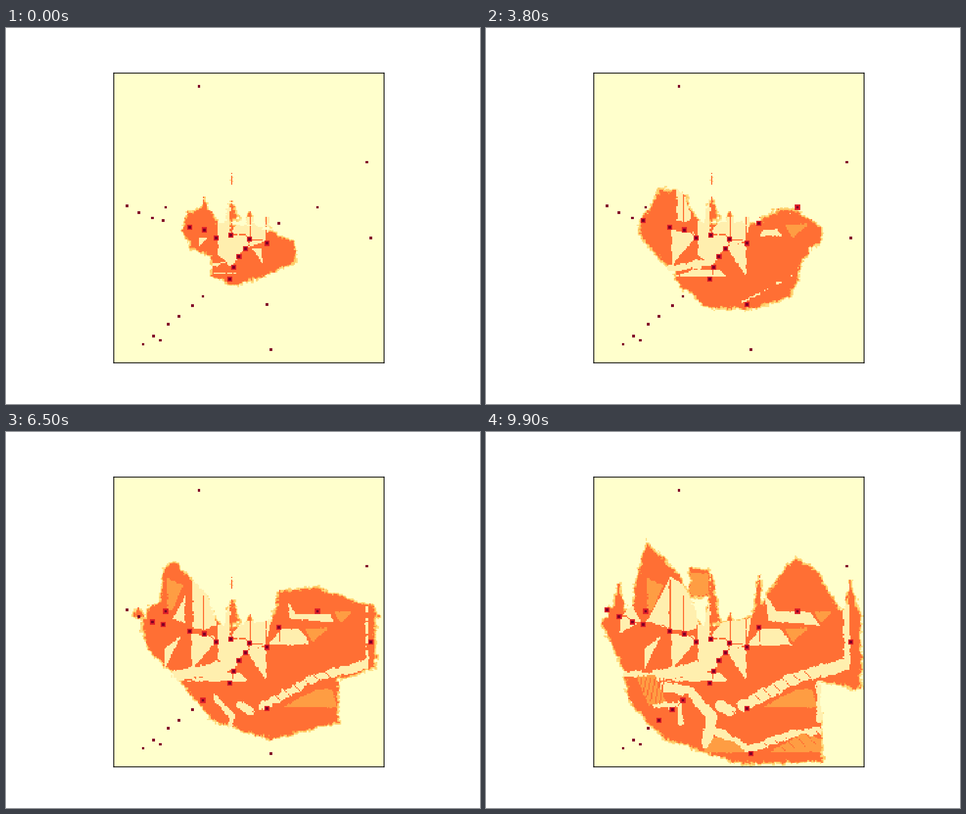
A matplotlib script for the animation above (10 s loop, 840x667 px).

```python
import numpy as np
import matplotlib.pyplot as plt
from matplotlib.animation import FuncAnimation
from matplotlib.colors import ListedColormap
from matplotlib.path import Path

ROWS, COLS = 218, 203
CELL, LEFT, TOP = 2.356, 191.4, 80.0
STEPS, STEP = 100, 0.1
COLOURS = ["#ffffcc", "#ffefae", "#fede84", "#feca66",
           "#fe9d43", "#ff6f34", "#dd2029", "#800026"]
PALE, RIM, EDGE, SOFT, FULL, HALO, FOOD = range(1, 8)

rng = np.random.default_rng(4)
X, Y = np.meshgrid(LEFT + (np.arange(COLS) + 0.5) * CELL,
                   TOP + (np.arange(ROWS) + 0.5) * CELL)
grain = rng.random(X.shape)


def smooth(a, n):
    """Box blur with unit spread."""
    for axis in (0, 1):
        a = sum(np.roll(a, i, axis) for i in range(n))
    return a / a.std()


rough = 0.5 * smooth(rng.normal(size=X.shape), 2) + 0.7 * smooth(rng.normal(size=X.shape), 5)


def distance(pts, closed=True):
    """Distance in cells to a line, or signed distance to a polygon."""
    p = np.reshape(pts, (-1, 2)).astype(float)
    ends = np.roll(p, -1, 0) if closed else p[1:]
    best = np.full(X.shape, np.inf)
    for (ax, ay), (bx, by) in zip(p, ends):
        dx, dy = bx - ax, by - ay
        u = np.clip(((X - ax) * dx + (Y - ay) * dy) / (dx * dx + dy * dy), 0, 1)
        best = np.minimum(best, np.hypot(X - ax - u * dx, Y - ay - u * dy))
    if closed:
        inside = Path(p).contains_points(np.c_[X.ravel(), Y.ravel()])
        best[inside.reshape(X.shape)] *= -1
    return best / CELL


def progress(t, t0, t1):
    return np.clip((t - t0) / (t1 - t0), 0, 1)


lobes, regions, veins = [], [], []


def spike(x, base, left, right, y0, y1, t0=0.0):
    """A finger whose tip climbs from y0 to y1 along a vein."""
    ends = [distance([x - left, base, x - 3, y, x + 3, y, x + right, base])
            for y in (y0, y1)]
    lobes.append((t0, 9.9, *ends))
    vein(t0, x, y1, x, base + 25)


def patch(level, t0, t1, *pts):
    d = distance(pts) + 0.3 * rough
    regions.append((level, t0, t1, d, -d.min()))


def trail(t0, t1, width, *pts):
    d = distance(pts, closed=False) + 0.6 * rough - width
    regions.append((PALE, t0, t1, d, width))


def vein(t0, x0, y0, x1, y1):
    n = int(max(abs(x1 - x0), abs(y1 - y0)) / CELL) + 1
    c = ((np.linspace(x0, x1, n) - LEFT) / CELL).astype(int)
    r = ((np.linspace(y0, y1, n) - TOP) / CELL).astype(int)
    veins.append((t0, r, c))


# Outline at the beginning, later and at the end
early, late, last = map(distance, (
    [310, 360, 321, 325, 345, 320, 352, 300, 370, 330, 378, 350, 390, 345, 470, 357,
     514, 380, 515, 415, 440, 450, 396, 458, 362, 440, 362, 406, 328, 392],
    [238, 350, 250, 310, 272, 300, 278, 240, 300, 228, 350, 280, 383, 345, 470, 335,
     480, 282, 550, 272, 625, 300, 655, 305, 657, 420, 590, 440, 592, 516, 470, 548,
     368, 515, 297, 432, 250, 385],
    [203, 345, 215, 308, 258, 312, 265, 260, 284, 190, 350, 260, 383, 345, 470, 325,
     510, 265, 548, 218, 590, 250, 628, 312, 665, 315, 667, 460, 592, 445, 600, 588,
     440, 589, 315, 545, 252, 480, 240, 415]))

spike(399, 345, 10, 18, 308, 248)
spike(432, 350, 6, 10, 325, 318)
spike(462, 355, 5, 8, 336, 334)
spike(484, 346, 16, 10, 345, 252, 2)
spike(646, 330, 14, 18, 310, 262, 6)
spike(236, 330, 18, 14, 318, 268, 5)
vein(0, 374, 343, 374, 404)
vein(0, 351, 290, 351, 358)
vein(6, 326, 262, 326, 353)

# Pale ground left behind
patch(PALE, -2, -1, 376, 343, 386, 343, 397, 300, 397, 362, 418, 338, 470, 330,
      461, 380, 425, 388, 400, 424, 376, 403)
patch(PALE, -1, 1.5, 426, 386, 461, 380, 461, 440)
patch(PALE, -1, 4, 328, 357, 368, 362, 372, 373, 330, 420)
patch(PALE, -0.5, 8, 328, 350, 326, 255, 350, 270, 372, 315, 378, 345, 352, 356)
patch(PALE, -1, 5, 368, 427, 412, 427, 430, 442, 320, 442)
patch(PALE, 2, 7, 462, 379, 488, 348, 520, 348, 543, 378)
patch(PALE, 3.8, 8, 494, 285, 515, 318, 575, 319, 592, 343, 500, 335)
patch(PALE, 4.8, 8, 285, 335, 325, 262, 325, 350)
patch(PALE, 5, 6.5, 281, 420, 281, 385, 310, 362)
patch(PALE, 7, 8.4, 240, 330, 256, 304, 275, 335, 238, 358)
trail(-1, 7, 4.5, 300, 432, 345, 426, 400, 412)
trail(5.5, 8.2, 2.5, 639, 310, 639, 418)
trail(3.4, 8, 4.5, 455, 485, 500, 462, 550, 435, 632, 414)
trail(6.5, 9.5, 2, 590, 445, 590, 510)
trail(7.2, 9.2, 3, 405, 530, 465, 562, 545, 535, 588, 530)
trail(5, 8, 4, 372, 473, 400, 505, 392, 550)
trail(4.5, 7, 4, 415, 485, 436, 495)
trail(6.5, 8.4, 3.5, 315, 452, 360, 458, 380, 485)
trail(7, 8.4, 2, 300, 483, 343, 484, 345, 515)
trail(8.5, 9.8, 2, 245, 428, 300, 431)

# Softer orange
patch(SOFT, 2, 2.9, 530, 348, 570, 348, 543, 373)
patch(SOFT, 4.5, 6, 286, 259, 314, 271, 296, 315, 286, 318)
patch(SOFT, 5, 6.4, 580, 319, 614, 319, 592, 339)
patch(SOFT, 3.5, 5, 488, 488, 550, 456, 578, 455, 586, 488)
patch(SOFT, 7.2, 8.4, 266, 433, 300, 432, 318, 478, 288, 485)
patch(SOFT, 7.5, 9, 500, 568, 560, 535, 597, 545, 598, 568)
patch(SOFT, 8.6, 9.8, 385, 568, 405, 541, 440, 548, 460, 568)
patch(SOFT, 8.8, 9.8, 363, 251, 394, 251, 394, 289, 363, 289)

# Slanting threads across the bands
for i in range(6):
    vein(5, 474 + 18 * i, 464 - 8 * i, 485 + 18 * i, 475 - 8 * i)
    vein(8, 495 + 18 * i, 552 - 4 * i, 511 + 18 * i, 568 - 4 * i)
    vein(7.6, 268 + 8 * i, 472 + 2 * i, 276 + 8 * i, 436)
    vein(5, 438 + 4 * i, 495, 462, 519 - 4 * i)

# Food as (x, y, time of discovery); neighbours in a chain are joined
LATER = 99
chains = [
    [(214, 316, 8.8), (236, 327, 6.8), (259, 337, 4.8), (278, 342, 3.4),
     (325, 353, 0), (351, 358, 0), (372, 372, 0)],
    [(398, 367, 0), (431, 375, 0), (461, 381, 0), (483, 346, 1.9)],
    [(431, 375, 0), (424, 391, 0), (412, 405, 0), (403, 424, 0), (396, 445, 0)],
    [(306, 511, 9), (330, 492, 7.2), (348, 476, 5.8)],
    [(278, 342, 3.4), (283, 318, 4.9)],
]
lone = [(461, 490, 3.3), (551, 318, 3.7), (645, 372, 5.9), (468, 570, 7.3),
        (287, 525, LATER), (262, 545, LATER), (273, 552, LATER),
        (243, 559, LATER), (341, 103, LATER), (638, 238, LATER)]
for chain in chains:
    for (x0, y0, t0), (x1, y1, t1) in zip(chain, chain[1:]):
        # first straight, then at 45 degrees
        dx, dy = x1 - x0, y1 - y0
        diag = min(abs(dx), abs(dy))
        mx, my = x1 - diag * np.sign(dx), y1 - diag * np.sign(dy)
        vein(max(t0, t1), x0, y0, mx, my)
        vein(max(t0, t1), mx, my, x1, y1)
foods = sum(chains, []) + lone


def outline(t):
    if t < 6.5:
        d = early + (late - early) * progress(t, 0, 6.5)
    else:
        d = late + (last - late) * progress(t, 6.5, 9.9)
    for t0, t1, a, b in lobes:
        if t >= t0:
            d = np.minimum(d, a + (b - a) * progress(t, t0, t1))
    # a block pushing out of the middle finger to the left
    edge = 400 - 41 * progress(t, 8.6, 9.9)
    slab = np.maximum(np.abs(Y - 267) - 27, np.maximum(edge - X, X - 400))
    return np.minimum(d, slab / CELL) + 0.8 * rough


def state(t):
    d = outline(t)
    alive = d < 0
    grid = np.where(alive, FULL, 0)
    for level, t0, t1, area, depth in regions:
        if t > t0:
            grid[alive & (area < (progress(t, t0, t1) - 1) * depth)] = level
    front = alive & (grid != PALE)
    grid[front & (d > -2) & (grain < 0.4)] = SOFT
    grid[front & (d > -1.3)] = EDGE
    grid[front & (d > -0.6)] = RIM
    for t0, r, c in veins:
        if t >= t0:
            on = alive[r, c]
            grid[r[on], c[on]] = FULL
    for x, y, t0 in foods:
        c = round((x + 0.5 - LEFT) / CELL) - 1
        r = round((y + 0.5 - TOP) / CELL) - 1
        if t >= t0:
            grid[r - 1:r + 3, c - 1:c + 3] = HALO
        grid[r:r + 2, c:c + 2] = FOOD
    return grid


fig, ax = plt.subplots(figsize=(8.4, 6.67), dpi=100)
ax.set_xticks([])
ax.set_yticks([])
ax.spines[:].set_linewidth(1.1)
image = ax.imshow(state(0), cmap=ListedColormap(COLOURS), vmin=-0.5, vmax=7.5,
                  interpolation="nearest")


def update(i):
    image.set_data(state(i * STEP))
    return [image]


anim = FuncAnimation(fig, update, frames=STEPS, interval=1000 * STEP,
                     repeat=True, repeat_delay=0)
plt.show()
```
